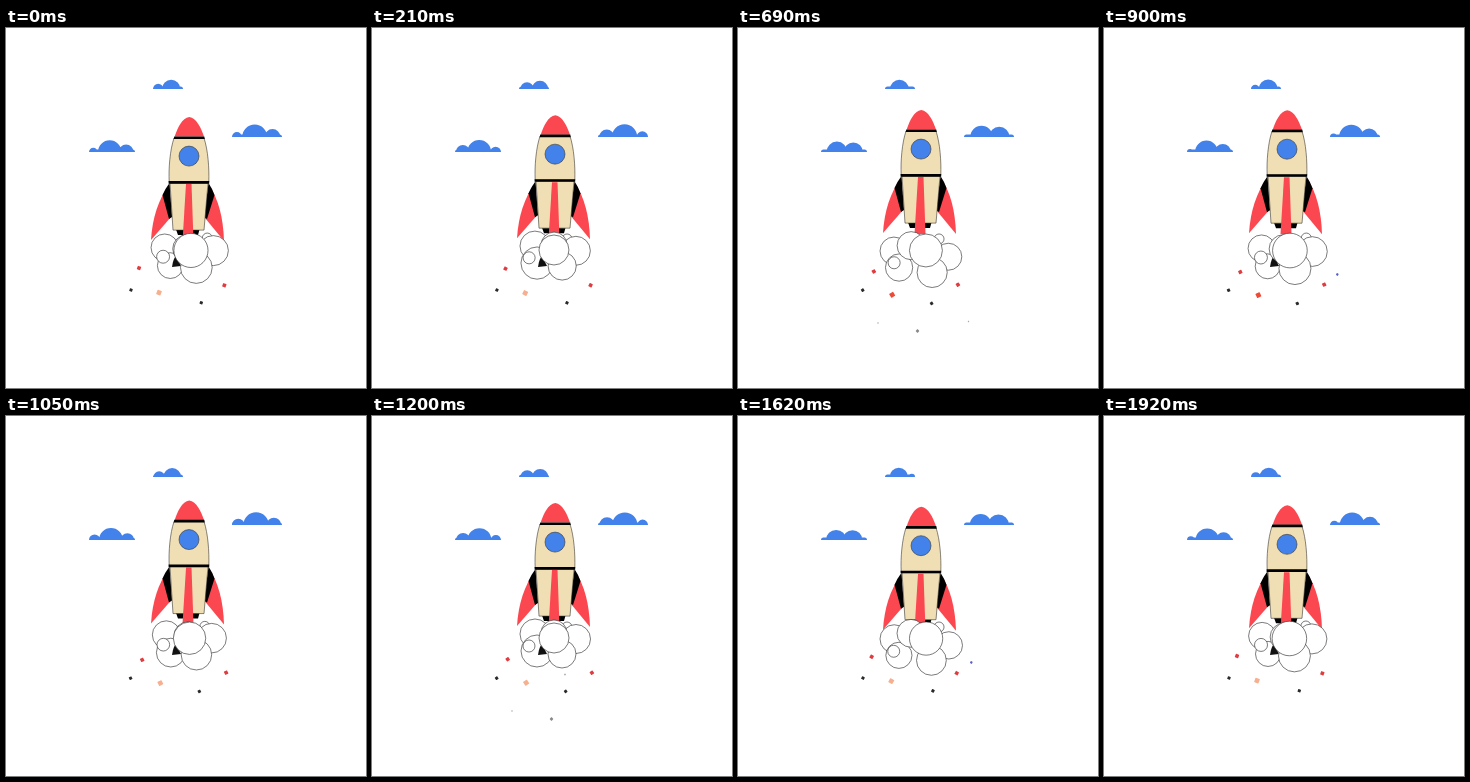
These frames come from a looping animation (360 px wide and 360 px high, 1.95 s). An HTML page:

```html
<!DOCTYPE html>
<html lang="en">
<head>
<meta charset="utf-8">
<title>Rocket launch</title>
<style>
  html, body { margin: 0; width: 100%; height: 100%; overflow: hidden; background: #fff; }
  svg { display: block; width: 100vw; height: 100vh; }
  .cloud, .glass { fill: #4282ea; }
  .red { fill: #fb474f; }
  .cream { fill: #f0dfb4; }
  .line { stroke: #3a3632; stroke-width: .6; }
  .puff { fill: #fff; stroke: #222; stroke-width: .6; }
</style>
</head>
<body>
<svg viewBox="0 0 360 360">
  <defs><clipPath id="glass"><circle cx="183" cy="128" r="9.7"/></clipPath></defs>
  <g id="clouds"></g>
  <g id="rocket">
    <path class="red" d="M163 157Q147 179 145 212L165 189Z"/>
    <path class="red" d="M203 157Q217 178 218 213L199 190Z"/>
    <path d="M163.5 155Q159 161 156.5 167L163 191L166 189Z"/>
    <path d="M202.5 155Q206.5 161 208.5 167L201 191L198 189Z"/>
    <path d="M170 201.5H193.5L192 207H172Z"/>
    <path class="cream line" d="M164 155H202L198 202H167Z"/>
    <path class="red" d="M180 156H185.5L187.5 213H176.5Z"/>
    <path class="cream line" d="M168 110C164 122 162.5 140 163.2 154H202.800C203.3 140 202 122 198 110Z"/>
    <path class="red" d="M183.3 89C176 90 171.5 100 168.7 108.5H198C195 100 190.5 90 183.3 89Z"/>
    <path d="M168.3 108.3H198.3L198.8 111H167.6ZM162.6 153H203.2V155.6H162.6Z"/>
    <circle class="glass line" cx="183" cy="128" r="10"/>
    <g clip-path="url(#glass)">
      <rect id="shine" x="-7" y="-16" width="14" height="32" fill="#fff"/>
    </g>
  </g>
  <g id="smoke"></g>
  <g id="sparks"></g>
</svg>
<script>
const LOOP = 1950, STEP = 30, CYCLE = LOOP / 2;
const $ = id => document.getElementById(id);

function add(parent, tag, attrs) {
  const el = document.createElementNS('http://www.w3.org/2000/svg', tag);
  set(el, attrs);
  parent.append(el);
  return el;
}
function set(el, attrs) {
  for (const k in attrs) el.setAttribute(k, attrs[k]);
}

// Smooth periodic curve through the values at the given times
function curve(times, vals, period, t) {
  const n = times.length;
  const wrap = i => ((i % n) + n) % n;
  const at = i => times[wrap(i)] + Math.floor(i / n) * period;
  const val = i => vals[wrap(i)];
  const slope = i => (val(i + 1) - val(i - 1)) / (at(i + 1) - at(i - 1));
  let i = -1;
  while (at(i + 1) <= t) i++;
  const h = at(i + 1) - at(i), u = (t - at(i)) / h, v = 1 - u;
  return v * v * (1 + 2 * u) * val(i) + u * u * (3 - 2 * u) * val(i + 1)
    + h * u * v * (v * slope(i) - u * slope(i + 1));
}

// Clouds: bumps travel right, swelling towards the middle
const clouds = [
  { x: 83, w: 46, base: 124, gap: 16.4, start: 103.7, mid: 106, reach: 27, r: 12 },
  { x: 226, w: 50, base: 109, gap: 17.8, start: 248.7, mid: 251, reach: 29.5, r: 12.8 },
  { x: 147, w: 30, base: 61, gap: 13, start: 165.2, mid: 163, reach: 18, r: 9.6 }
];
for (const c of clouds) {
  c.el = add($('clouds'), 'path', { class: 'cloud' });
}
function drawCloud(c, t) {
  const right = c.x + c.w;
  let d = `M${c.x} ${c.base}q0 -2.5 2.5 -2.5h${c.w - 5}q2.5 0 2.5 2.5z`;
  for (let k = -2; k <= 2; k++) {
    const x = c.start + (t / CYCLE % 1 + k) * c.gap;
    const swell = c.r * (1 - Math.abs((x - c.mid) / c.reach) ** 1.5);
    const r = Math.min(swell, x - c.x, right - x);
    if (r > 0) d += `M${x - r} ${c.base}a${r} ${r} 0 0 1 ${2 * r} 0z`;
  }
  c.el.setAttribute('d', d);
}

// Smoke puffs, back to front: x, y and radius at four moments of a cycle
const beats = [.23, .43, .69, .96];
const puffs = [
  { x: [195, 201, 201, 202], y: [211, 211, 211, 210], r: [5, 5.5, 5, 5] },
  { x: [163, 160, 156, 158], y: [218, 220, 223, 220], r: [15, 16, 14, 13.5] },
  { x: [204, 213, 210.5, 208], y: [223, 230, 229, 223], r: [14.5, 16.5, 13.5, 15] },
  { x: [165, 162, 161, 164], y: [235, 236, 239.5, 238], r: [16, 7.5, 13.5, 12.5] },
  { x: [157, 153, 156, 157], y: [230, 235, 235, 229], r: [6, 6, 6, 6.5] },
  { x: [190, 184, 194, 190.5], y: [238, 240, 244.5, 240], r: [14, 14, 15, 16] },
  { x: [182, 177, 173, 180], y: [217, 217, 217.5, 221], r: [13, 13, 14, 14] },
  { x: [182, 187.5, 188, 185.5], y: [222, 223, 222.5, 222.5], r: [15, 18.5, 16.5, 17.3] }
];
let gap;
puffs.forEach((p, i) => {
  if (i === 5) gap = add($('smoke'), 'path', { d: 'M166 239Q167 231 170 228L175 238Z', fill: '#111' });
  p.el = add($('smoke'), 'circle', { class: 'puff' });
});

// Sparks sway between two points
const red = '#e03c40', black = '#2a2a2a';
const sparks = [
  { from: [133, 240], to: [136.3, 244], size: 3.6, fill: red },
  { from: [218.3, 257.3], to: [220.2, 256.6], size: 3.6, fill: red },
  { from: [125, 262], to: [124.6, 262.2], size: 3, fill: black },
  { from: [195.3, 274.7], to: [193.3, 275.5], size: 3, fill: black },
  { from: [153, 264.6], to: [154.4, 267.2], size: 4.6, fill: '#f6b090', hot: [600, 1050] }
];
const specks = [
  { at: [233.3, 246.5], fill: '#5a62c8', size: 2.2, on: [[840, 990], [1560, 1740]] },
  { at: [179.5, 303], fill: '#888', size: 2.8, on: [[600, 780], [1140, 1290]] },
  { at: [140, 295], fill: '#aaa', size: 1.4, on: [[600, 780], [1140, 1290]] },
  { at: [230.5, 293.5], fill: '#aaa', size: 1.4, on: [[600, 780]] },
  { at: [193, 258.5], fill: '#999', size: 1.5, on: [[1110, 1290]] }
];
const square = s => add($('sparks'), 'rect', {
  x: -s.size / 2, y: -s.size / 2, width: s.size, height: s.size, rx: .5, fill: s.fill
});
for (const s of sparks) s.el = square(s);
for (const s of specks) {
  s.el = square(s);
  s.el.setAttribute('transform', `translate(${s.at}) rotate(45)`);
}
const during = (t, [a, b]) => t >= a && t < b;

const liftTimes = [0, 420, 690, 900, 1200, 1620, 1920];
const lift = [.1, -3.9, -6.9, -6.8, -1.9, 1.7, .3];

function draw(t) {
  $('rocket').setAttribute('transform', `translate(0 ${curve(liftTimes, lift, LOOP, t)})`);
  const sweep = (t - 360) / 9;
  set($('shine'), {
    transform: `translate(${183 + sweep} ${128 + sweep}) rotate(45)`,
    visibility: during(t, [240, 480]) ? 'visible' : 'hidden'
  });

  clouds.forEach(c => drawCloud(c, t));

  const phase = t / CYCLE % 1;
  for (const p of puffs) {
    set(p.el, {
      cx: curve(beats, p.x, 1, phase),
      cy: curve(beats, p.y, 1, phase),
      r: curve(beats, p.r, 1, phase)
    });
  }
  gap.setAttribute('visibility', during(phase, [.5, .88]) ? 'hidden' : 'visible');

  const sway = (1 + Math.cos((t - 930) / LOOP * 2 * Math.PI)) / 2;
  for (const s of sparks) {
    const [x, y] = s.from.map((v, i) => v + (s.to[i] - v) * sway);
    set(s.el, {
      transform: `translate(${x} ${y}) rotate(${20 + 45 * sway})`,
      fill: s.hot && during(t, s.hot) ? '#ee4a36' : s.fill
    });
  }
  for (const s of specks) {
    s.el.setAttribute('visibility', s.on.some(w => during(t, w)) ? 'visible' : 'hidden');
  }
}

const begin = performance.now();
function tick() {
  const t = (performance.now() - begin) % LOOP;
  draw(Math.floor(t / STEP) * STEP);
  requestAnimationFrame(tick);
}
draw(0);
requestAnimationFrame(tick);
</script>
</body>
</html>
```
